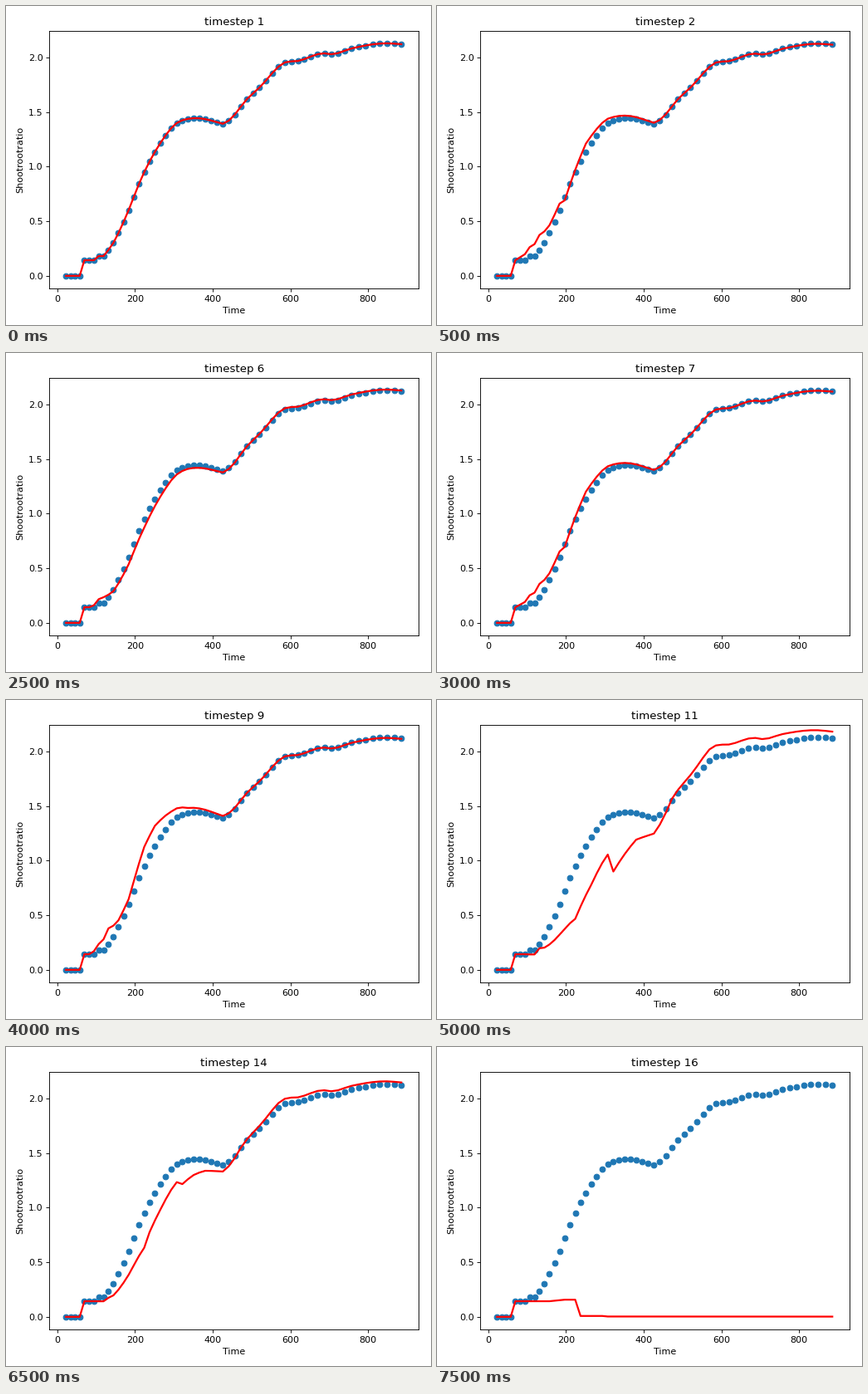
A matplotlib script for the animation above (8000 ms loop, 512 by 384 pixels).

```python
import numpy as np
import matplotlib.pyplot as plt
from matplotlib.animation import FuncAnimation

W, H, DPI = 512, 384, 80
STEPS, STEP_MS = 16, 500

idx = np.arange(58)
time = 22.5 + 11.59 * idx + 0.0623 * idx**2


def smooth(*points):
    """Cubic Hermite curve through a few key points."""
    x, y = np.array(points).T
    slope = np.gradient(y, x)
    i = np.clip(np.searchsorted(x, idx, side="right") - 1, 0, len(x) - 2)
    h = x[i + 1] - x[i]
    t = (idx - x[i]) / h
    return ((1 + 2 * t) * (1 - t)**2 * y[i] + t**2 * (3 - 2 * t) * y[i + 1]
            + h * t * (1 - t) * ((1 - t) * slope[i] - t * slope[i + 1]))


def straight(*points):
    return np.interp(idx, *zip(*points))


# Stepped start, then two growth phases with a pause between them
growth = smooth((8, .181), (10, .303), (12, .492), (16, .95), (19, 1.215),
                (22, 1.4), (24, 1.438), (26, 1.443), (29, 1.408), (30, 1.393),
                (31, 1.422), (34, 1.62), (36, 1.725), (40, 1.955), (42, 1.968),
                (46, 2.038), (47, 2.03), (50, 2.083), (55, 2.13), (57, 2.122))
ratio = np.select([idx < 4, idx < 7, idx < 9], [0, .143, .181], growth)

# Deviations of the fitted line from the measurements
late = (30, -.026), (36, .01), (41, .02), (57, .01)
slight_lag = straight((5, 0), (8, .089), (10, -.022), (13, -.11), (16, -.13),
                      (20, -.091), (24, -.045), *late)
lag = straight((6, 0), (7, -.038), (8, -.038), (10, -.109), (13, -.191),
               (16, -.246), (17, -.188), (22, -.09), (25, -.042), *late)
strong_lag = straight((6, 0), (7, -.04), (9, -.04), (13, -.279), (16, -.483),
                      (19, -.435), (22, -.344), (23, -.525), (27, -.243),
                      (30, -.145), (33, .015), (39, .103), (57, .06))
slight_lead = straight((4, 0), (9, .119), (11, .062), (13, .052), (14, -.026),
                       (15, -.006), (18, .066), (23, .026), (33, 0), (57, -.004))
lead = straight((5, 0), (7, .055), (9, .142), (11, .062), (13, .045), (16, .176),
                (18, .184), (21, .097), (24, .045), (33, .003), (57, -.006))


def collapse(rise, peak, end):
    """Hold the first level, climb a little from `rise`, drop to nothing at `end`."""
    return straight((3, 0), (4, .143), (rise, .143), (end - 3, peak), (end - 1, peak),
                    (end, .008), (end + 4, .008), (end + 5, .003), (57, .002))


lines = [
    ratio,
    ratio + 1.15 * slight_lead,
    collapse(5, .19, 14),
    ratio + slight_lag,
    ratio + 0.5 * lead,
    ratio + 0.6 * slight_lag,
    ratio + slight_lead,
    ratio + 1.4 * slight_lead,
    ratio + lead,
    ratio + 0.6 * (slight_lead + lead),
    ratio + strong_lag,
    ratio + 0.8 * slight_lead,
    ratio + lag,
    ratio + 0.7 * lag + 0.3 * strong_lag,
    collapse(7, .18, 15),
    collapse(11, .157, 17),
]

fig = plt.figure(figsize=(W / DPI, H / DPI), dpi=DPI)
ax = fig.add_axes([52.2 / W, 44.2 / H, 445 / W, 310 / H])
ax.scatter(time, ratio)
line, = ax.plot(time, lines[0], "r-", linewidth=2)
ax.set_xlim(-20.3, 930.3)
ax.set_ylim(-.114, 2.245)
ax.set_xlabel("Time")
ax.set_ylabel("Shootrootratio")


def update(step):
    line.set_ydata(lines[step])
    ax.set_title(f"timestep {step + 1}")
    return line,


anim = FuncAnimation(fig, update, frames=STEPS, interval=STEP_MS,
                     init_func=lambda: update(0), repeat=True, repeat_delay=0)
plt.show()
```
